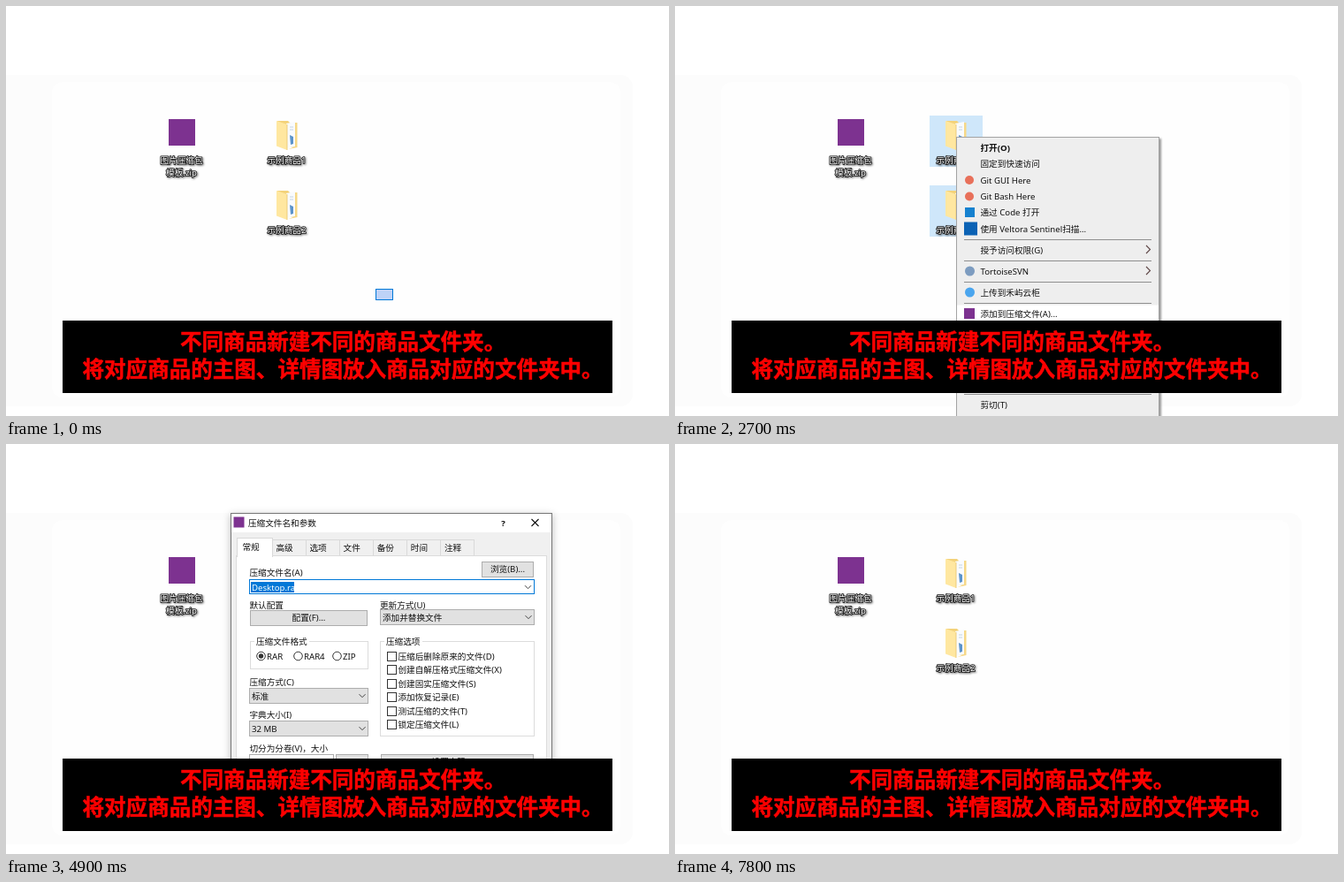
Animation of 750 by 464 pixels, one loop 8 s. Source, as an HTML page:

```html
<!DOCTYPE html>
<html lang="zh-CN">
<head>
<meta charset="utf-8">
<title>商品文件夹压缩</title>
<style>
html, body { margin: 0; width: 100%; height: 100%; overflow: hidden; background: #fff; }
svg { display: block; width: 750px; height: 464px; }
text { font: 9.65px "Noto Sans", "Noto Sans CJK SC", "Noto Sans CJK", sans-serif; fill: #111; white-space: pre; }
.mid { text-anchor: middle; }
.bold { font-weight: 700; }
.icon { text-anchor: middle; fill: #fff; stroke: #1c1c1c; stroke-width: 1.7px; paint-order: stroke; stroke-linejoin: round;
  filter: drop-shadow(1px 1px 1px rgba(0,0,0,.5)); }
.banner { font: 700 24.55px "Noto Sans CJK SC", "Noto Sans CJK", sans-serif; fill: #f00; stroke: #f00; stroke-width: .5px; }
.off { fill: #8a8a8a; }
#dialog { filter: drop-shadow(0 2px 4px rgba(0,0,0,.28)); }
#menu { filter: drop-shadow(2px 2px 1px rgba(0,0,0,.4)); }
</style>
</head>
<body>
<svg id="stage" viewBox="0 0 750 464"></svg>
<script>
const LOOP = 8000;
const BLUE = '#0078d7', PURPLE = '#7d3290';

// Shape helpers: boxes are given by their outer edges.
const box = (x1, y1, x2, y2, fill, line, extra = '') => line
  ? `<rect x="${x1 + .5}" y="${y1 + .5}" width="${x2 - x1 - 1}" height="${y2 - y1 - 1}" fill="${fill}" stroke="${line}" ${extra}/>`
  : `<rect x="${x1}" y="${y1}" width="${x2 - x1}" height="${y2 - y1}" fill="${fill}" ${extra}/>`;
const path = (d, fill, line = 'none', w = 1) =>
  `<path d="${d}" fill="${fill}" stroke="${line}" stroke-width="${w}"/>`;
const dot = (x, y, r, fill, extra = '') => `<circle cx="${x}" cy="${y}" r="${r}" fill="${fill}" ${extra}/>`;
const label = (x, y, s, cls = '', extra = '') => `<text x="${x}" y="${y + 3.5}" class="${cls}" ${extra}>${s}</text>`;
const square = (x, y, size, fill) => box(x - size / 2, y - size / 2, x + size / 2, y + size / 2, fill);
const chevron = (x, y) => path(`M${x - 3.5} ${y - 1.8}l3.5 3.5 3.5-3.5`, 'none', '#444');
const button = (x1, y1, x2, s) => box(x1, y1, x2, y1 + 18, '#e1e1e1', '#adadad') +
  label((x1 + x2) / 2, y1 + 8.7, s, 'mid');
const combo = (x1, y1, x2, s, id = '', fill = '#e1e1e1') => box(x1, y1, x2, y1 + 18, fill, '#adadad') +
  label(x1 + 3, y1 + 9, s, '', id && `id="${id}"`) + chevron(x2 - 7, y1 + 9);

const folder = (y, name) => `<g transform="translate(0 ${y})">` +
  box(288, 124, 348, 182, 'none', '', 'class="pick"') +
  path('M307 130h12l2 2h8v28h-16z', '#f3d27a') +
  path('M317 133l10-2v28l-10 2z', '#f9fbfd') +
  path('M321 137h4M321 140h4', 'none', '#c3d3e2') +
  path('M321 146l4 2v8l-3 1z', '#5b93cb') +
  path('M327 132h2.5v28l-10 2 7.500-3z', '#f6d887') +
  path('M306 130l12 4v29l-12-4.500z', '#ffe7a0') +
  path('M318 134v29', 'none', '#e8c66d', .8) +
  label(317.5, 174, name, 'icon') + '</g>';

function desktop() {
  return box(0, 0, 750, 464, '#fff') +
    box(-20, 78, 709, 453, '#fcfcfc', '', 'rx="14"') +
    box(52, 86, 695, 443, '#fefefe', '', 'rx="12"') +
    square(199, 143, 30, PURPLE) +
    label(198.5, 174, '图片压缩包', 'icon') + label(198.5, 188, '模板.zip', 'icon') +
    folder(0, '示例商品1') + folder(79, '示例商品2') +
    '<rect id="drag" fill="#3c78e6" fill-opacity=".33" stroke="#0078d7"/>';
}

function menu() {
  const rows = [[160, '打开(O)', 'bold'], [178.5, '固定到快速访问'], [197, 'Git GUI Here'], [215.5, 'Git Bash Here'],
    [233.5, '通过 Code 打开'], [252, '使用 Veltora Sentinel扫描...'], [276, '授予访问权限(G)'], [300, 'TortoiseSVN'],
    [324, '上传到禾屿云柜'], [348, '添加到压缩文件(A)...'], [451, '剪切(T)']];
  return '<g id="menu">' + box(318, 148, 548, 480, '#eee', '#a3a3a3') + '</g>' +
    box(319, 0, 547, 18.5, '#fff', '', 'id="hover"') +
    [264, 288, 312, 336, 439].map(y => box(327, y, 539, y + 1, '#8f8f8f')).join('') +
    rows.map(([y, s, cls]) => label(345.500, y, s, cls)).join('') +
    [276, 300].map(y => path(`M533 ${y - 5}l4.500 4.500-4.500 4.500`, 'none', '#5c4444', 1.1)).join('') +
    dot(333, 197, 5, '#e8705a') + dot(333, 215.500, 5, '#e8705a') +
    square(333.5, 233.5, 11, '#1681cf') + square(334.5, 252, 15, '#0b62b4') +
    dot(333.5, 300, 5.5, '#7d9cc0') + dot(333.5, 324, 5.5, '#4aa5ee') + square(333, 348, 12, PURPLE);
}

function dialog() {
  const tabs = ['高级', '选项', '文件', '备份', '时间', '注释'];
  const options = ['压缩后删除原来的文件(D)', '创建自解压格式压缩文件(X)', '创建固实压缩文件(S)',
    '添加恢复记录(E)', '测试压缩的文件(T)', '锁定压缩文件(L)'];
  const group = (x1, x2, y2, s, w) => box(x1, 218, x2, y2, 'none', '#dcdcdc') +
    box(x1 + 5, 212, x1 + 9 + w, 224, '#fff') + label(x1 + 7, 218, s);
  const radio = (x, id, s) => dot(x, 235, 4.8, '#fff', `stroke="#333" id="${id}Ring"`) +
    dot(x, 235, 2.7, '#333', `id="${id}Dot"`) + label(x + 6.5, 235, s);

  return '<g id="dialog">' + box(254, 73, 618, 425, '#f0f0f0', '#777') + '</g>' +
    box(255, 74, 617, 95, '#fff') + square(263.5, 83.5, 12, PURPLE) +
    label(274, 84, '压缩文件名和参数') + label(562.5, 84, '?', 'mid bold') +
    path('M594.500 80l8 8m0-8l-8 8', 'none', '#111', 1.1) +
    tabs.map((s, i) => box(301 + i * 38, 103, 340 + i * 38, 122, '#f0f0f0', '#d9d9d9') +
      label(315 + i * 38.100, 112, s, 'mid')).join('') +
    box(260, 121, 612, 390, '#fff', '#dcdcdc') +
    box(261, 101, 302, 123, '#fff', '#d9d9d9') + box(262, 120, 301, 125, '#fff') + label(277, 111, '常规', 'mid') +
    label(275.5, 140, '压缩文件名(A)') + button(538, 128, 597, '浏览(B)...') +
    box(275, 148, 598, 165, '#fff', BLUE, 'id="nameBox"') + box(277, 151, 326, 163, BLUE, '', 'id="mark"') +
    label(278, 157, '', '', 'id="fileName"') + chevron(590.5, 157) +
    label(275.500, 177, '默认配置') + button(276, 183, 409, '配置(F)...') +
    label(423, 177, '更新方式(U)') + combo(423, 182, 598, '添加并替换文件') +
    group(276, 410, 250, '压缩文件格式', 58) +
    radio(288.5, 'rar', 'RAR') + radio(330.5, 'rar4', 'RAR4') + radio(374.5, 'zip', 'ZIP') +
    group(423, 598, 326, '压缩选项', 39) +
    options.map((s, i) => {
      const y = 235.3 + i * 15.45, lock = [2, 3, 5].includes(i) ? 'lock' : '';
      return `<g class="${lock}">` + box(431, Math.round(y - 5.500), 442, Math.round(y + 5.500), '#fff', '#333') +
        label(443.5, y, s) + '</g>';
    }).join('') +
    label(275.500, 264, '压缩方式(C)') + combo(275, 271, 410, '标准') +
    label(275.500, 301.500, '字典大小(I)') + combo(275, 308, 410, '', 'dict') +
    label(275.500, 339, '切分为分卷(V)，大小') + combo(275, 346, 371, '', '', '#fff') + combo(373, 346, 410, 'MB') +
    button(424, 346, 597, '设置密码(P)...') +
    button(386, 399, 458, '确定') + button(463, 399, 535, '取消') + button(540, 399, 611, '帮助');
}

const stage = document.getElementById('stage');
stage.innerHTML = desktop() + `<g id="menuLayer">${menu()}</g><g id="dialogLayer">${dialog()}</g>` +
  box(64, 356, 686, 438, '#000') +
  '<text class="banner" x="197" y="389.300">不同商品新建不同的商品文件夹。</text>' +
  '<text class="banner" x="86.500" y="420">将对应商品的主图、详情图放入商品对应的文件夹中。</text>';

const $ = id => document.getElementById(id);
const set = (el, attrs) => { for (const k in attrs) el.setAttribute(k, attrs[k]); };
const picks = [...document.querySelectorAll('.pick')];
const locks = [...document.querySelectorAll('.lock')];

// Step tables: [start in ms, values...]; the last started row holds.
const dragSteps = [[0, 418, 320], [100, 397, 288], [200, 356, 216], [300, 309, 139], [400, 284, 95], [500, 0, 0]];
const pickSteps = [[0, 'none'], [300, '#cfe7fa'], [3300, '#f3f3f3'], [7600, 'none']];
const menuSteps = [[0, 0], [1200, .5], [1300, .85], [1400, 1], [3000, .6], [3100, .25], [3200, 0]];
const hoverSteps = [[0, -50], [1600, 224.5], [1700, 314.5], [1800, 338.5], [2100, -50], [2700, 338.5]];
const fadeSteps = [[0, 0], [3500, .45], [3600, .85], [3700, 1], [7600, .5], [7700, .12], [7800, 0]];
const moveSteps = [[0, 709, 346], [4600, 640, 306], [4700, 478, 210], [4800, 318, 116], [4900, 254, 78], [5000, 254, 73]];
const rarSteps = [[0, 1], [6100, .85], [6200, .5], [6300, .2], [6400, 0]];
const zipSteps = [[0, 0], [6000, .6], [6100, 1]];
const zipInk = [[0, '#333'], [5900, '#2f97e0'], [6600, '#333']];
const nameInk = [[0, BLUE], [6100, '#3f93cc'], [6300, '#7a7a7a']];

const at = (steps, t) => steps.filter(s => s[0] <= t).pop().slice(1);

function draw(t) {
  const [left, top] = at(dragSteps, t);
  set($('drag'), { x: left + .5, y: top + .5, width: 437 - left, height: Math.max(0, 332 - top), opacity: left ? 1 : 0 });
  const [pick] = at(pickSteps, t);
  picks.forEach(p => set(p, { fill: pick }));

  set($('menuLayer'), { opacity: at(menuSteps, t)[0] });
  set($('hover'), { y: at(hoverSteps, t)[0] });

  const [x, y] = at(moveSteps, t);
  set($('dialogLayer'), { transform: `translate(${x - 254} ${y - 73})`, opacity: at(fadeSteps, t)[0] });

  const zipped = t >= 6000;
  $('fileName').textContent = zipped ? 'Desktop.zip' : 'Desktop.rar';
  $('fileName').style.fill = zipped ? '#111' : '#fff';
  $('dict').textContent = zipped ? '32 KB' : '32 MB';
  set($('mark'), { opacity: zipped ? 0 : 1 });
  set($('nameBox'), { stroke: at(nameInk, t)[0] });
  set($('rarDot'), { opacity: at(rarSteps, t)[0] });
  set($('rar4Dot'), { opacity: 0 });
  const [ink] = at(zipInk, t);
  set($('zipRing'), { stroke: ink });
  set($('zipDot'), { fill: ink, opacity: at(zipSteps, t)[0] });
  locks.forEach(g => {
    set(g.firstChild, { stroke: zipped ? '#bcbcbc' : '#333' });
    g.lastChild.classList.toggle('off', zipped);
  });
}

function tick() {
  draw(performance.now() % LOOP);
  requestAnimationFrame(tick);
}
tick();
</script>
</body>
</html>
```
